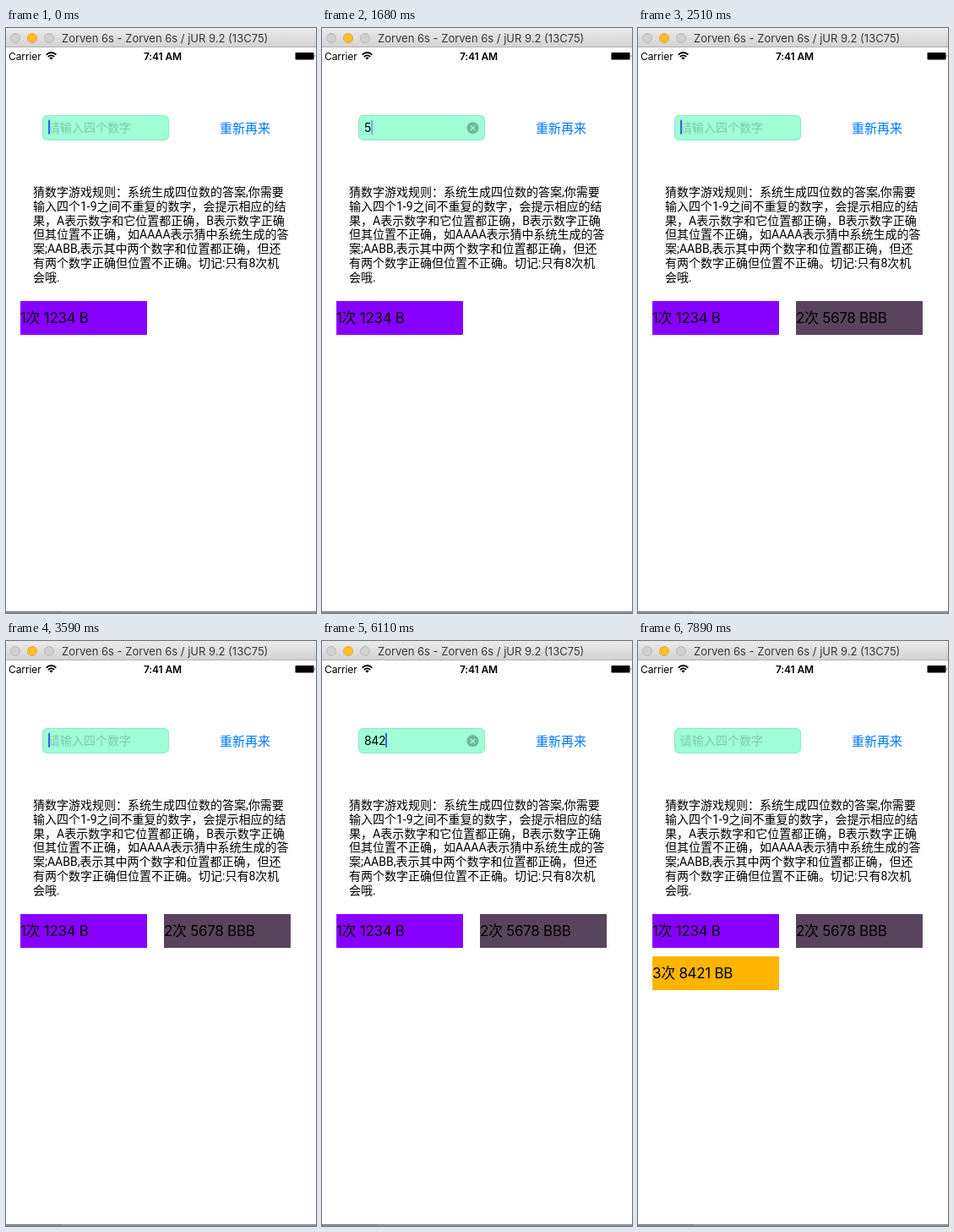
An HTML page for the animation above (8000 ms loop, 367 by 692 pixels).

```html
<!DOCTYPE html>
<html lang="zh-CN">
<head>
<meta charset="utf-8">
<style>
html, body { margin: 0; width: 100%; height: 100%; overflow: hidden; background: #fefefe; }
svg { display: block; width: 367px; height: 692px; }
text { font-family: Inter, "Noto Sans CJK SC", "Noto Sans CJK", sans-serif; font-size: 14px; white-space: pre; }
#rules text { font-family: Roboto, "Noto Sans CJK SC", "Noto Sans CJK", sans-serif; }
.tile text { font-size: 17px; letter-spacing: -.3px; }
</style>
</head>
<body>
<svg viewBox="0 0 367 692">
  <defs>
    <linearGradient id="bar" x2="0" y2="1">
      <stop stop-color="#ebebeb"/>
      <stop offset="1" stop-color="#d3d3d3"/>
    </linearGradient>
  </defs>
  <rect width="367" height="692" fill="#fefefe"/>

  <g id="titlebar">
    <rect width="367" height="22" fill="url(#bar)"/>
    <rect y="22" width="367" height="1" fill="#b4b4b4"/>
    <g fill="#d0d0d0" stroke="#bababa">
      <circle cx="11" cy="12" r="5.5"/>
      <circle cx="31" cy="12" r="5.5" fill="#ffbd2e" stroke="#e6a62b"/>
      <circle cx="51" cy="12" r="5.5"/>
    </g>
    <text x="66" y="17" fill="#383838" style="font-size:13px">Zorven 6s - Zorven 6s / jUR 9.2 (13C75)</text>
  </g>

  <g id="status">
    <text x="3" y="38" style="font-size:12px;letter-spacing:-.1px">Carrier</text>
    <g fill="none" stroke="#000" stroke-width="1.8">
      <path d="M47.6 31.6Q53.5 26.4 59.4 31.6"/>
      <path d="M49.8 34Q53.5 30.8 57.2 34"/>
    </g>
    <path d="M51.4 35.4Q53.5 33.8 55.6 35.4L53.5 37.6Z"/>
    <text x="185.5" y="38" text-anchor="middle" style="font-size:12px;font-weight:600;letter-spacing:-.1px">7:41 AM</text>
    <rect x="342.5" y="29" width="22" height="8.5" rx=".8"/>
    <path d="M365.6 31.6q1.4 1.6 0 3.2z"/>
  </g>

  <g id="field">
    <rect x="43.5" y="103.5" width="149" height="29" rx="5" fill="#9fffd6" stroke="#90e4c2"/>
    <text id="hint" x="50" y="123" fill="#80c9ac">请输入四个数字</text>
    <text id="typed" x="50" y="123" style="letter-spacing:-.3px"></text>
    <g id="clear">
      <circle cx="178.5" cy="118.3" r="7" fill="#72b69a"/>
      <path d="M175.8 115.6l5.4 5.4m0-5.4l-5.4 5.4" stroke="#9fffd6" stroke-width="1.2"/>
    </g>
    <rect id="caret" y="108.5" width="2" height="17.5" rx="1" fill="#3a62e6"/>
  </g>
  <text x="253" y="124" fill="#007aff" style="font-size:15px">重新再来</text>

  <g id="rules"></g>
  <g id="tiles"></g>

  <rect y="690" width="367" height="2" fill="#9a9a9a"/>
  <rect y="690" width="66" height="1" fill="#6c6c6c"/>
  <rect x="66" y="690" width="301" height="1" fill="#7e7e7e"/>
</svg>
<script>
const LOOP = 8000;
const $ = id => document.getElementById(id);

const rules = [
  '猜数字游戏规则：系统生成四位数的答案,你需要',
  '输入四个1-9之间不重复的数字，会提示相应的结',
  '果，A表示数字和它位置都正确，B表示数字正确',
  '但其位置不正确，如AAAA表示猜中系统生成的答',
  '案;AABB,表示其中两个数字和位置都正确，但还',
  '有两个数字正确但位置不正确。切记:只有8次机',
  '会哦.'
];
$('rules').innerHTML = rules.map((line, i) =>
  `<text x="32" y="${199.3 + i * 16.7}">${line}</text>`).join('');

// start time, x, y, colour, label
const guesses = [
  [0, 17, 323, '#8800ff', '1次 1234 B'],
  [2510, 187, 323, '#58445c', '2次 5678 BBB'],
  [6220, 17, 373, '#ffb400', '3次 8421 BB']
];
$('tiles').innerHTML = guesses.map(([, x, y, fill, label]) =>
  `<g class="tile"><rect x="${x}" y="${y}" width="150" height="40" fill="${fill}"/>
   <text x="${x}" y="${y + 26}">${label}</text></g>`).join('');
const tiles = [...$('tiles').children];

// start time, typed text
const typing = [
  [0, ''], [1680, '5'], [2040, '56'], [2270, '567'], [2510, ''],
  [5150, '8'], [5750, '84'], [6110, '842'], [6220, '']
];

// start time, caret opacity
const ON = 1, HALF = .5, OFF = .08;
const blink = [
  [0, ON], [480, HALF], [600, OFF], [960, HALF], [1080, ON], [1440, HALF], [1560, OFF],
  [1680, HALF], [1800, ON], [3110, HALF], [3230, OFF], [3590, ON], [4070, HALF], [4190, OFF],
  [4550, HALF], [4670, ON], [5030, HALF], [5150, ON], [6820, HALF], [6940, OFF],
  [7300, HALF], [7410, ON], [7770, HALF], [7890, OFF]
];

const at = (steps, t) => steps.findLast(([start]) => start <= t)[1];
const show = (el, on) => el.setAttribute('visibility', on ? 'visible' : 'hidden');

function draw() {
  const t = performance.now() % LOOP;
  const text = at(typing, t);
  const typed = $('typed');
  typed.textContent = text;
  show($('hint'), !text);
  show($('clear'), text);
  $('caret').setAttribute('x', 50 + (text && Math.round(typed.getComputedTextLength())));
  $('caret').setAttribute('opacity', at(blink, t));
  tiles.forEach((tile, i) => show(tile, t >= guesses[i][0]));
  requestAnimationFrame(draw);
}
draw();
</script>
</body>
</html>
```
